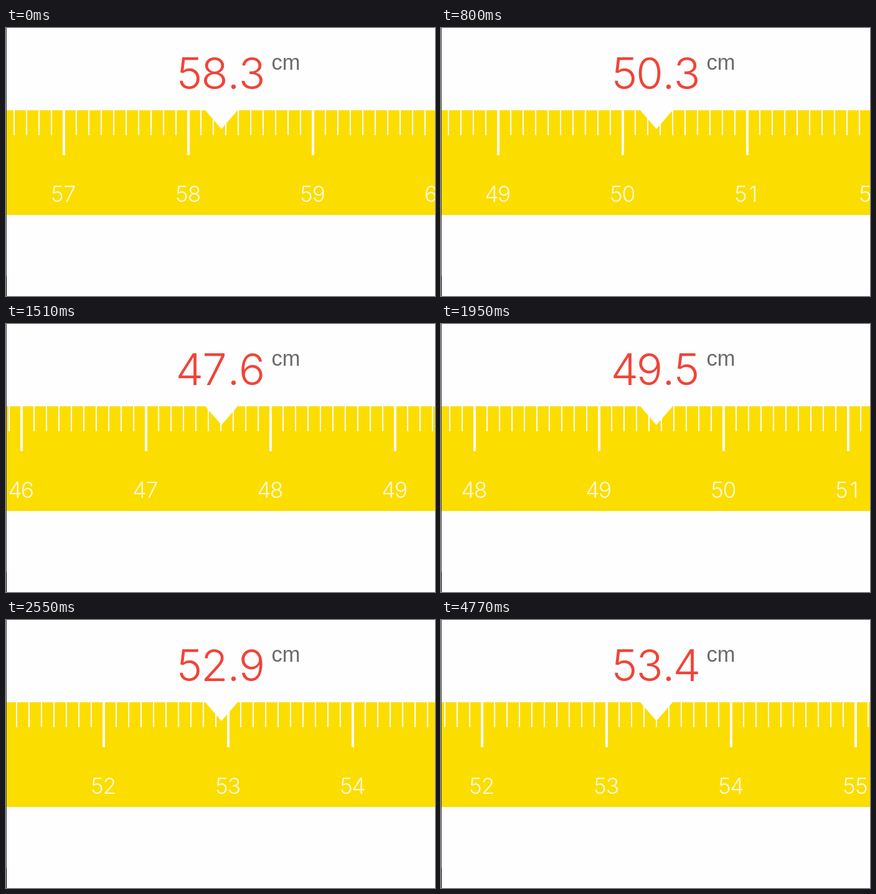
An HTML page with a canvas that plays this animation: 689 px wide and 430 px high, repeating every 4.87 s.

```html
<!DOCTYPE html>
<html lang="en">
<head>
<meta charset="utf-8">
<title>Ruler</title>
<style>
  html, body { margin: 0; width: 100%; height: 100%; overflow: hidden; background: #fefefe; }
  canvas { display: block; }
</style>
</head>
<body>
<canvas id="stage" width="689" height="430"></canvas>
<script>
const ctx = document.getElementById('stage').getContext('2d');
const LOOP = 4870, TICK = 87.7;
const WIDTH = 689, POINTER = 346, CM = 200;
const TOP = 132, BOTTOM = 300;
const PAPER = '#fefefe';

// [tick, centimetres, speed in cm per tick]
const path = [
  [0, 58.267, -0.8], [5, 54.052, -0.94], [9, 50.27, -0.95], [14, 47.6, 0],
  [16, 47.6, 0], [17, 47.605, 0.06], [25, 51.286, 0.6], [33, 53.4, 0]
];

function valueAt(tick) {
  const i = path.findIndex(p => p[0] > tick);
  if (i < 0) return path[path.length - 1][1];
  const [t0, a, va] = path[i - 1], [t1, b, vb] = path[i];
  const span = t1 - t0, u = (tick - t0) / span, w = 1 - u;
  return w * w * (1 + 2 * u) * a + u * u * (3 - 2 * u) * b
       + span * u * w * (w * va - u * vb);
}

function rect(color, x, y, w, h) {
  ctx.fillStyle = color;
  ctx.fillRect(x, y, w, h);
}

// Places each character on the centre of its own cell
function digits(text, centers, y) {
  [...text].forEach((c, i) => ctx.fillText(c, centers[i], y));
}

function drawRuler(value) {
  rect('#fcdd00', 1, TOP, WIDTH, BOTTOM - TOP);
  ctx.font = '300 35.5px Inter, Roboto, sans-serif';
  ctx.textAlign = 'center';
  const first = Math.floor((value - 2) * 10);
  for (let n = first; n < first + 42; n++) {
    const x = Math.round(POINTER + (n / 10 - value) * CM);
    const major = n % 10 === 0;
    if (major) {
      rect(PAPER, x - 2, TOP, 4, 72);
      ctx.fillStyle = 'rgba(255,255,255,.85)';
      digits(String(n / 10), [x - 10.5, x + 9.5], 278.5);
    } else {
      rect(PAPER, x - 1, TOP, 2, 40);
    }
  }
  ctx.fillStyle = PAPER;
  ctx.beginPath();
  ctx.moveTo(POINTER - 26, TOP);
  ctx.lineTo(POINTER + 26, TOP);
  ctx.lineTo(POINTER, 162);
  ctx.fill();
}

function drawReadout(value) {
  ctx.fillStyle = '#f04438';
  ctx.font = '300 70.5px Inter, Roboto, sans-serif';
  digits(value.toFixed(1), [295, 335, 365.5, 395], 97.5);
  ctx.fillStyle = '#6b6b6d';
  ctx.font = '34.5px "Liberation Sans", Arial, sans-serif';
  ctx.textAlign = 'left';
  ctx.fillText('cm', 426.5, 67);
}

function draw() {
  const tick = Math.floor(performance.now() % LOOP / TICK);
  const value = valueAt(tick);
  rect(PAPER, 0, 0, WIDTH, 430);
  drawRuler(value);
  drawReadout(value);
  rect('#444', 0, 0, 1, 398);
  rect('#000', 0, 398, 1, 32);
  requestAnimationFrame(draw);
}
draw();
</script>
</body>
</html>
```
